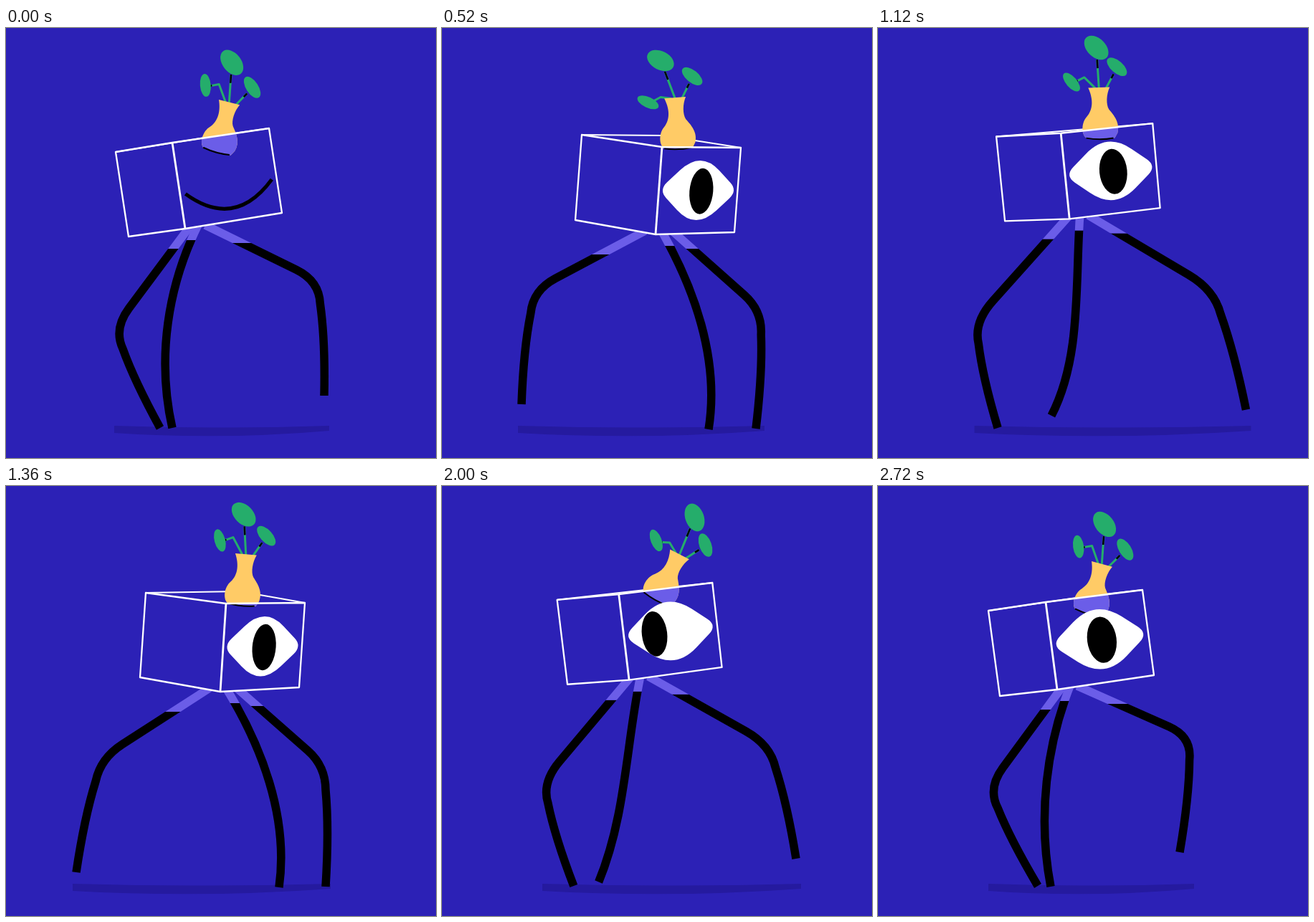
These frames come from a looping animation (600 by 600 pixels, 2.76 s). An HTML page with a canvas:

```html
<!DOCTYPE html>
<html lang="en">
<head>
<meta charset="utf-8">
<title>Walking box</title>
<style>
  html, body { margin: 0; width: 100%; height: 100%; overflow: hidden; background: #2c21b6; }
  canvas { display: block; width: 600px; height: 600px; }
</style>
</head>
<body>
<canvas id="stage" width="600" height="600"></canvas>
<script>
const ctx = document.getElementById('stage').getContext('2d');
const BLUE = '#2c21b6', SHADE = '#251a9f', VIOLET = '#6b5de8', ORANGE = '#ffcb66', GREEN = '#25ad6b';
const STEP = 40, FRAMES = 69, CYCLE = 22;
const RAD = Math.PI / 180;

// Step in the loop -> position in the walk (three strides of CYCLE).
const WALK = [[0, 0], [13, 10], [22, 19], [34, 31], [44, 40], [57, 53], [68, 65], [69, 66]];

// Walk position, then x,y of: top left/middle/right, bottom left/middle/right, top back, vase.
const BODY = [
  [0, 153, 173, 232, 160, 367, 140, 171, 291, 250, 280, 385, 258, 290, 151, 298, 158],
  [4.5, 172, 144, 268, 144, 392, 134, 180, 262, 276, 264, 398, 252, 298, 138, 316, 134],
  [9, 195, 149, 307, 164, 417, 163, 187, 267, 299, 287, 409, 281, 326, 147, 330, 151],
  [10, 195, 149, 307, 166, 417, 167, 186, 268, 298, 288, 408, 285, 308, 150, 329, 153],
  [18, 161, 176, 247, 168, 379, 159, 170, 294, 255, 290, 388, 279, 290, 165, 303, 170],
  [19, 158, 177, 241, 166, 375, 155, 170, 295, 253, 288, 387, 274, 290, 161, 302, 171],
  [21, 154, 174, 234, 162, 369, 145, 170, 293, 250, 284, 385, 264, 290, 154, 298, 163]
];
const LEFT_KNEE = [[0, 150, 420], [4.5, 128, 405], [9, 132, 380], [10, 127, 366], [13.5, 142, 378],
  [18, 163, 432], [19, 160, 430], [21, 153, 422]];
const LEFT_FOOT = [[0, 215, 558], [4, 150, 558], [7, 95, 558], [8, 91, 551], [9, 98, 539], [10, 111, 525],
  [13, 190, 508], [15.5, 268, 542], [16.3, 270, 558], [18, 252, 558], [19, 243, 558], [21, 223, 558]];
const RIGHT_KNEE = [[0, 437, 353], [4.5, 478, 372], [9, 446, 391], [10, 447, 395], [14, 430, 408],
  [18, 417, 388], [19, 427, 373], [21, 438, 350]];
const RIGHT_FOOT = [[0, 444, 513], [2, 494, 520], [4, 529, 548], [4.7, 530, 558], [7, 482, 558], [9, 446, 559],
  [10, 438, 559], [14, 384, 558], [16, 360, 558], [17, 359, 551], [18, 366, 540], [19, 379, 525], [21, 421, 511]];
const MID_BEND = [[0, 226, 210], [4.5, 300, 320], [9, 355, 395], [10, 350, 388], [18, 264, 260],
  [19, 252, 246], [21, 236, 222]];
const MID_FOOT = [[0, 232, 558], [1.5, 219, 558], [2.5, 226, 546], [5, 320, 526], [7, 396, 550], [7.7, 397, 560],
  [9, 381, 560], [10, 372, 560], [18, 268, 559], [19, 259, 559], [21, 241, 559]];

// Step, vase tilt, leaf sway, left leaf height, left leaf angle.
const PLANT = [[0, 14, -2, -71, 85], [13, -4, -9, -52, 25], [22, -6, 9, -55, 22], [34, 5, 0, -72, 75],
  [44, 23, -9, -58, 67], [57, 28, 16, -62, 73], [68, 15, -3, -71, 82]];
const LOOK = [[0, .02], [13, .04], [34, .02], [38, .02], [42, -.22], [49, -.22], [53, .02]];

// Smooth curve through the rows, repeating after the period.
function track(rows, u, period) {
  const n = rows.length;
  const row = i => rows[(i + n) % n];
  const time = i => row(i)[0] + Math.floor(i / n) * period;
  let i = 0;
  while (i < n - 1 && time(i + 1) <= u) i++;
  const h = time(i + 1) - time(i), s = (u - time(i)) / h;
  const slope = (j, k) => (row(j + 1)[k] - row(j - 1)[k]) / (time(j + 1) - time(j - 1)) * h;
  return row(i).slice(1).map((p, c) => {
    const k = c + 1, q = row(i + 1)[k], a = slope(i, k), b = slope(i + 1, k);
    return p + s * (a + s * (3 * (q - p) - 2 * a - b + s * (2 * (p - q) + a + b)));
  });
}

function walkAt(step) {
  const i = WALK.findIndex(w => w[0] > step);
  const [t0, u0] = WALK[i - 1], [t1, u1] = WALK[i];
  return (u0 + (u1 - u0) * (step - t0) / (t1 - t0)) % CYCLE;
}

const mix = (a, b, k) => a + (b - a) * k;
const between = (p, q, k) => [mix(p[0], q[0], k), mix(p[1], q[1], k)];

function poly(points, close) {
  ctx.beginPath();
  points.forEach(p => ctx.lineTo(...p));
  if (close) ctx.closePath();
}

function stroke(color, width) {
  ctx.strokeStyle = color;
  ctx.lineWidth = width;
  ctx.stroke();
}

function fill(color) {
  ctx.fillStyle = color;
  ctx.fill();
}

function bentLeg(hip, knee, foot, side) {
  const into = between(knee, hip, .2), out = between(knee, foot, .2), low = between(out, foot, .4);
  ctx.beginPath();
  ctx.moveTo(...hip);
  ctx.lineTo(...into);
  ctx.quadraticCurveTo(...knee, ...out);
  ctx.quadraticCurveTo(low[0] + side * 5, low[1], ...foot);
}

function midLeg(hip, bend, foot) {
  ctx.beginPath();
  ctx.moveTo(...hip);
  ctx.bezierCurveTo(bend[0], 360, bend[1], 460, ...foot);
}

// The part of a leg above the cut is violet.
function paintLeg(cut) {
  stroke('#000', 11.5);
}
function drawLeg(path, cut) {
  for (const [color, top, height] of [['#000', cut, 600], [VIOLET, 0, cut]]) {
    ctx.save();
    ctx.beginPath();
    ctx.rect(0, top, 600, height);
    ctx.clip();
    path();
    stroke(color, 11.5);
    ctx.restore();
  }
}

function drawLegs(u, box) {
  const at = rows => track(rows, u, CYCLE);
  const [ex, ey] = box.bm, yaw = (ex - 250) / 49;
  const hip = (a, b) => [ex + mix(a, b, yaw), ey - 5];
  const leftKnee = at(LEFT_KNEE), leftFoot = at(LEFT_FOOT);
  const rightKnee = at(RIGHT_KNEE), rightFoot = at(RIGHT_FOOT);

  const x0 = Math.min(leftFoot[0] - 5, leftKnee[0] + 1);
  const x1 = Math.max(rightFoot[0] + 7, rightKnee[0] + 3);
  ctx.beginPath();
  ctx.moveTo(x0, 555);
  ctx.quadraticCurveTo((x0 + x1) / 2, 560, x1, 555);
  ctx.lineTo(x1, 562);
  ctx.quadraticCurveTo((x0 + x1) / 2, 575, x0, 565);
  fill(SHADE);

  ctx.save();
  poly([[0, box.bl[1]], box.bl, box.bm, box.br, [600, box.br[1]], [600, 600], [0, 600]], true);
  ctx.clip();
  drawLeg(() => bentLeg(hip(28, 23), rightKnee, rightFoot, 1), ey + 20);
  drawLeg(() => bentLeg(hip(8, -15), leftKnee, leftFoot, -1), ey + 28);
  drawLeg(() => midLeg(hip(18, 8), at(MID_BEND), at(MID_FOOT)), ey + 16);
  ctx.restore();
}

function leaf(x, y, long, wide, angle) {
  ctx.beginPath();
  ctx.ellipse(x, y, long, wide, angle * RAD, 0, 7);
  fill(GREEN);
}

// A green stem whose last stretch is black.
function stem(points) {
  const end = points.length - 1;
  poly(points);
  stroke(GREEN, 3);
  poly([between(points[end - 1], points[end], .7), points[end]]);
  stroke('#000', 2.5);
}

function vase(color) {
  ctx.beginPath();
  ctx.moveTo(-15, -56);
  ctx.lineTo(15, -56);
  ctx.bezierCurveTo(10, -46, 9, -32, 13, -25);
  ctx.bezierCurveTo(20, -16, 28, -6, 24, 8);
  ctx.lineTo(20, 15);
  ctx.quadraticCurveTo(0, 18, -20, 14);
  ctx.bezierCurveTo(-27, 8, -26, -8, -18, -16);
  ctx.bezierCurveTo(-8, -27, -9, -42, -15, -56);
  fill(color);
}

function drawPlant(step, pos, front) {
  const [tilt, sway, leftY, leftAngle] = track(PLANT, step, FRAMES);
  const place = () => {
    ctx.translate(...pos);
    ctx.rotate(tilt * RAD);
  };
  ctx.save();
  place();
  const c = Math.cos(sway * RAD), s = Math.sin(sway * RAD);
  const big = [-8 * c + 55 * s, -56 - 8 * s - 55 * c];
  stem([[0, -55], between([0, -56], big, .7)]);
  stem([[10, -55], [21, -74]]);
  stem([[-5, -55], [-20, leftY - 6], [-33, leftY]]);
  leaf(...big, 20, 13, 40 + sway);
  leaf(26, -84, 17, 8.5, 43);
  leaf(-38, leftY, 16, 7.5, leftAngle - tilt);
  vase(ORANGE);
  ctx.restore();

  ctx.save();
  poly(front, true);
  ctx.clip();
  place();
  vase(VIOLET);
  ctx.beginPath();
  ctx.moveTo(-20, 14);
  ctx.quadraticCurveTo(0, 18, 18, 15);
  stroke('#000', 2);
  ctx.restore();
}

function eyeShape() {
  const tips = [[-.5, 0], [0, -.453], [.5, 0], [0, .453]];
  ctx.beginPath();
  tips.forEach((tip, i) => {
    const round = i % 2 ? .5 : .2;
    ctx.lineTo(...between(tip, tips[(i + 3) % 4], round));
    ctx.quadraticCurveTo(...tip, ...between(tip, tips[(i + 1) % 4], round));
  });
  ctx.closePath();
}

function drawEye(step, box) {
  const { tm, tr, bm, br } = box;
  const open = Math.min(1, Math.max(0, (step - 2) / 3));
  const cx = (tm[0] + tr[0] + bm[0] + br[0]) / 4, cy = (tm[1] + tr[1] + bm[1] + br[1]) / 4;
  ctx.save();
  ctx.transform(tr[0] - tm[0], tr[1] - tm[1], bm[0] - tm[0], bm[1] - tm[1], cx, cy);
  if (open) {
    const look = track(LOOK, step, FRAMES)[0];
    ctx.translate(0, .3 * (1 - open));
    ctx.scale(1, open);
    eyeShape();
    fill('#fff');
    ctx.clip();
    ctx.beginPath();
    ctx.ellipse(look, .01, .15 - Math.max(0, -look) * .09, .262, 0, 0, 7);
    fill('#000');
    ctx.restore();
  } else {
    ctx.beginPath();
    ctx.moveTo(-.445, .11);
    ctx.quadraticCurveTo(0, .6, .45, .09);
    ctx.restore();
    stroke('#000', 5);
  }
}

function draw(step) {
  const u = walkAt(step), v = track(BODY, u, CYCLE);
  const box = {};
  ['tl', 'tm', 'tr', 'bl', 'bm', 'br', 'back', 'vase'].forEach((name, i) => {
    box[name] = [v[2 * i], v[2 * i + 1]];
  });
  const front = [box.tl, box.tm, box.tr, box.br, box.bm, box.bl];

  ctx.fillStyle = BLUE;
  ctx.fillRect(0, 0, 600, 600);
  ctx.lineJoin = 'round';
  drawLegs(u, box);
  poly([box.tl, box.back, box.tr]);
  stroke('#fff', 2);
  drawPlant(step, box.vase, front);
  poly(front, true);
  stroke('#fff', 2.3);
  poly([box.tm, box.bm]);
  stroke('#fff', 2.8);
  drawEye(step, box);
}

function tick() {
  draw(Math.floor(performance.now() / STEP) % FRAMES);
  requestAnimationFrame(tick);
}
tick();
</script>
</body>
</html>
```
